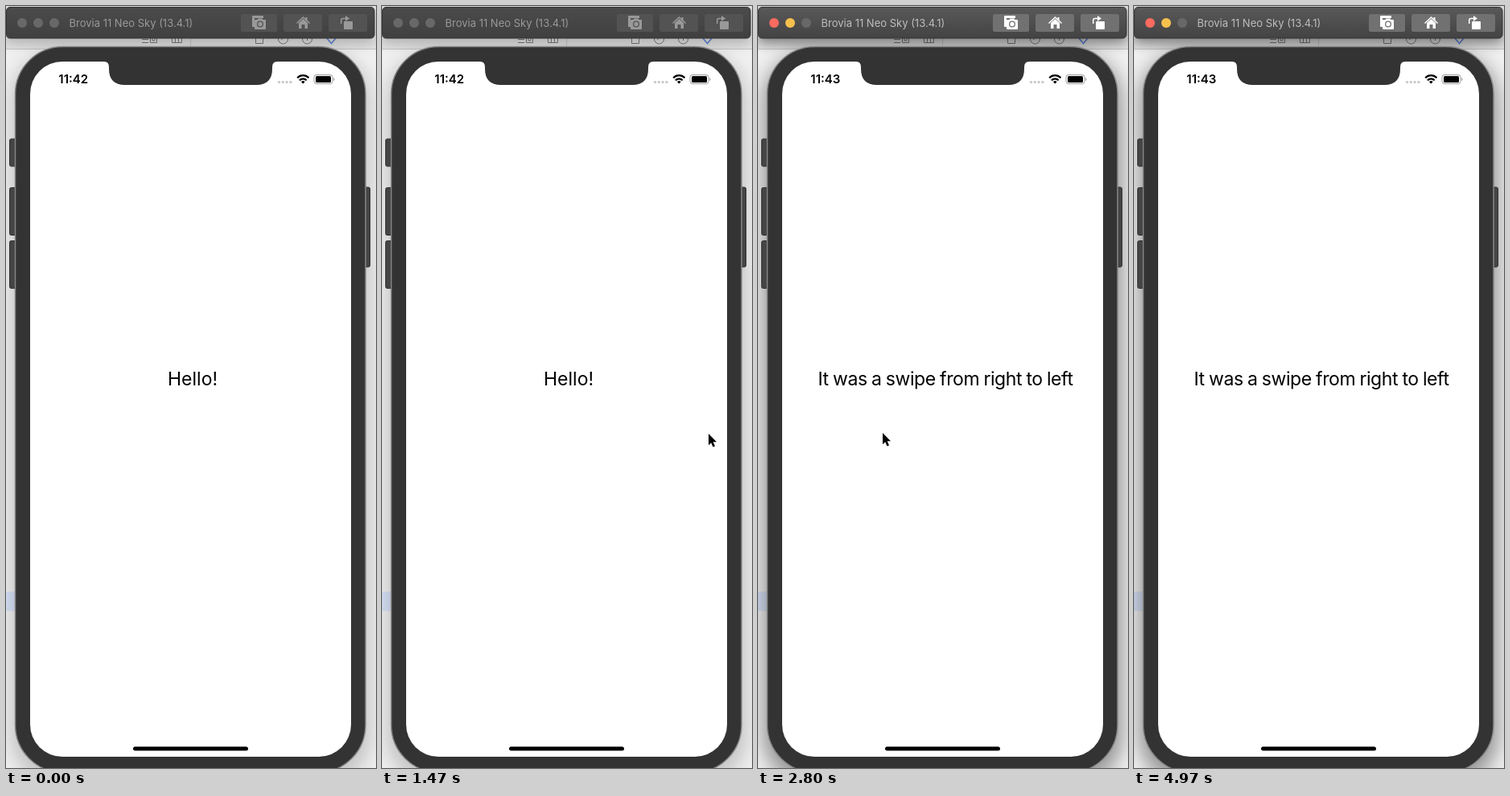
Write an HTML page that moves like this. It is 460 by 946 pixels and loops after 5390 ms.

```html
<!DOCTYPE html>
<html lang="en">
<head>
<meta charset="utf-8">
<title>Swipe demo</title>
<style>
  html, body { margin: 0; width: 100%; height: 100%; overflow: hidden; background: #ececec; }
  svg { display: block; width: 460px; height: 946px; font-family: Inter, Roboto, sans-serif; }
  .shade { opacity: .42; }
  .active .shade { opacity: .85; }
  .bar { fill: url(#barIdle); }
  .active .bar { fill: url(#barActive); }
  .title { font-size: 13px; fill: #999; }
  .active .title { fill: #bdbdbd; }
  .light { fill: #686868; }
  .active .close { fill: #fa6b60; }
  .active .mini { fill: #f6c04c; }
  .button { fill: #535353; }
  .active .button { fill: #717171; }
  .icon { fill: #999; stroke: #999; }
  .active .icon { fill: #fff; stroke: #fff; }
  .hole { fill: #535353; stroke: none; }
  .active .hole { fill: #717171; }
  .clock { font-size: 15px; font-weight: 600; }
  .label { font-size: 23px; }
  .long { letter-spacing: -.4px; word-spacing: -.8px; }
</style>
</head>
<body>
<svg id="stage" viewBox="0 0 460 946">
  <defs>
    <linearGradient id="barIdle" x2="0" y2="1">
      <stop stop-color="#4b4b4b"/><stop offset="1" stop-color="#404040"/>
    </linearGradient>
    <linearGradient id="barActive" x2="0" y2="1">
      <stop stop-color="#595959"/><stop offset="1" stop-color="#434343"/>
    </linearGradient>
    <filter id="soft" x="-20%" y="-20%" width="140%" height="140%"><feGaussianBlur stdDeviation="12"/></filter>
    <filter id="barSoft" x="-20%" y="-60%" width="140%" height="220%"><feGaussianBlur stdDeviation="8"/></filter>
  </defs>

  <!-- desktop behind the device -->
  <rect width="460" height="946" fill="#f0f0f0"/>
  <rect width="460" height="53" fill="#e2e2e2"/>
  <path d="M0 53.5H460M229.5 36V53" stroke="#c4c4c4"/>
  <rect y="727" width="11" height="24" fill="#d9e3f8"/>
  <g fill="none" stroke="#777">
    <path d="M169 41.5H177M169 45.5H177M179.500 37V45.500H187.500V37M182 38V43H185V38M206.500 37V45.500H218.500V37M210.500 37V45M214.500 37V45M310.500 37V46.500H319.500V37"/>
    <circle cx="344.500" cy="41" r="6"/><path d="M342 42L347 38"/>
    <circle cx="374.500" cy="41" r="6"/><path d="M374.500 38V43"/>
    <path d="M399 40L404.500 46.500 410 40" stroke="#5c82d6" stroke-width="1.500"/>
  </g>
  <g class="shade">
    <rect x="6" y="58" width="447" height="908" rx="60" opacity=".45" filter="url(#soft)"/>
    <rect x="0" y="8" width="458" height="38" opacity=".55" filter="url(#barSoft)"/>
  </g>

  <!-- title bar -->
  <rect class="bar" x=".5" y="1.500" width="457.500" height="38.500" rx="4.500" stroke="#333"/>
  <circle class="light close" cx="20" cy="21" r="6"/>
  <circle class="light mini" cx="40" cy="21" r="6"/>
  <circle class="light" cx="60" cy="21" r="6"/>
  <text class="title" x="78.500" y="25.700">Brovia 11 Neo Sky (13.4.1)</text>
  <rect class="button" x="292" y="10" width="45" height="22" rx="2.500"/>
  <rect class="button" x="345" y="10" width="48" height="22" rx="2.500"/>
  <rect class="button" x="401" y="10" width="48" height="22" rx="2.500"/>
  <g class="icon" stroke="none" stroke-width="0">
    <path d="M307 12H319Q320 12 320 13V15H309V26H307Q306 26 306 25V13Q306 12 307 12Z"/>
    <path d="M310 17H312.500L313.500 15.500H318.500L319.500 17H322Q323 17 323 18V28Q323 29 322 29H310Q309 29 309 28V18Q309 17 310 17Z"/>
    <circle class="hole" cx="316" cy="22.500" r="4"/><circle cx="316" cy="22.500" r="2.700"/>
    <path d="M364 21L369.500 16 375 21V28H371.500V23H367.500V28H364Z"/>
    <rect x="372.500" y="14" width="2" height="4"/>
    <rect x="420" y="19" width="11" height="10" rx="1"/>
    <path d="M422 12L427 15.500 422 19Z"/>
  </g>
  <g class="icon" style="fill:none" stroke-width="1.500">
    <path d="M361.500 21.500L369.500 14 377.500 21.500M416.700 22V18Q416.700 15.500 419 15.500H423"/>
  </g>

  <!-- device -->
  <g fill="#454545" stroke="#303030">
    <rect x="4.500" y="165" width="12" height="34" rx="2"/>
    <rect x="4.500" y="225.500" width="12" height="59" rx="2"/>
    <rect x="4.500" y="291.500" width="12" height="59" rx="2"/>
    <rect x="440" y="225" width="12.500" height="99" rx="2"/>
  </g>
  <rect x="11.500" y="50.500" width="435.500" height="901" rx="59" fill="#333" stroke="#858585" stroke-width="1.500"/>
  <rect x="30" y="69" width="399" height="863" rx="40" fill="#fff"/>
  <path d="M122 68H337V69Q331 69 331 76V78Q331 98 311 98H148Q128 98 128 78V76Q128 69 122 69Z" fill="#333"/>
  <rect x="158" y="919.500" width="143" height="5" rx="2.500"/>

  <!-- status bar -->
  <text id="clock" class="clock" x="65.300" y="96"></text>
  <g fill="#cbcbcb">
    <circle cx="339.500" cy="94.500" r="1.700"/><circle cx="344.300" cy="94.500" r="1.700"/>
    <circle cx="349.100" cy="94.500" r="1.700"/><circle cx="353.900" cy="94.500" r="1.700"/>
  </g>
  <g fill="none" stroke="#000" stroke-width="2.200">
    <path d="M362.200 89.200A9.700 9.700 0 0 1 376.400 89.200M364.900 92.200A6.200 6.200 0 0 1 373.700 92.200"/>
  </g>
  <path d="M369.300 96.500L366.900 94Q369.300 92 371.700 94Z"/>
  <rect x="383" y="85.500" width="23" height="11" rx="3" fill="none" stroke="#999"/>
  <rect x="385" y="87" width="19" height="8" rx="1.500"/>
  <path d="M407.300 89V93Q408.600 92.500 408.600 91T407.300 89Z" fill="#999"/>

  <text id="label" class="label" y="471"></text>
  <circle id="ring" r="20" fill="#fff" stroke="#000" stroke-width="3"/>
  <path id="cursor" d="M0 0V14.300L3.200 11.300 5.500 16.600 8 15.500 5.700 10.300H10Z" stroke="#fff" stroke-width="1.400" paint-order="stroke" stroke-linejoin="round"/>
</svg>
<script>
  const LOOP = 5390, TICK = 70;
  const SWIPE = { press: 1960, recognised: 2170, release: 2590 };

  const linear = p => p;
  const easeOut = p => 1 - (1 - p) ** 2;
  const easeInOut = p => p * p * (3 - 2 * p);
  const glide = p => .35 * p + .65 * easeInOut(p);

  // time, x, y, easing from the previous stop
  const stops = [
    [70, 250, 923, linear],
    [560, 366, 577, easeOut],
    [770, 366, 577, linear],
    [910, 384, 560, linear],
    [1330, 404, 532, easeOut],
    [1470, 406, 531, linear],
    [1960, 406, 531, linear],
    [2030, 384, 531, linear],
    [2450, 165, 529, glide],
    [2520, 155, 530, linear],
    [3990, 155, 530, linear],
    [4550, 243, 902, easeInOut],
    [4690, 246, 948, linear]
  ];

  const find = id => document.getElementById(id);
  const [stage, clock, label, ring, cursor] = ['stage', 'clock', 'label', 'ring', 'cursor'].map(find);

  function pointerAt(t) {
    const i = stops.findIndex(s => s[0] >= t);
    if (i < 0 || t < stops[0][0]) return null;
    const [t1, x1, y1, ease] = stops[i];
    const [t0, x0, y0] = stops[Math.max(0, i - 1)];
    const p = t1 > t0 ? ease((t - t0) / (t1 - t0)) : 1;
    return [x0 + (x1 - x0) * p, y0 + (y1 - y0) * p];
  }

  function place(node, point) {
    node.style.display = point ? '' : 'none';
    if (point) node.setAttribute('transform', `translate(${point.map(Math.round)})`);
  }

  function draw(now) {
    const t = Math.floor((now % LOOP) / TICK) * TICK;
    const swiped = t >= SWIPE.recognised;
    const pointer = pointerAt(t);
    const pressed = t >= SWIPE.press && t < SWIPE.release;

    stage.classList.toggle('active', t >= SWIPE.press);
    clock.textContent = swiped ? '11:43' : '11:42';
    label.textContent = swiped ? 'It was a swipe from right to left' : 'Hello!';
    label.classList.toggle('long', swiped);
    label.setAttribute('x', swiped ? 74.5 : 201);
    place(cursor, pointer);
    place(ring, pressed ? pointer : null);
    requestAnimationFrame(draw);
  }
  draw(0);
</script>
</body>
</html>
```
